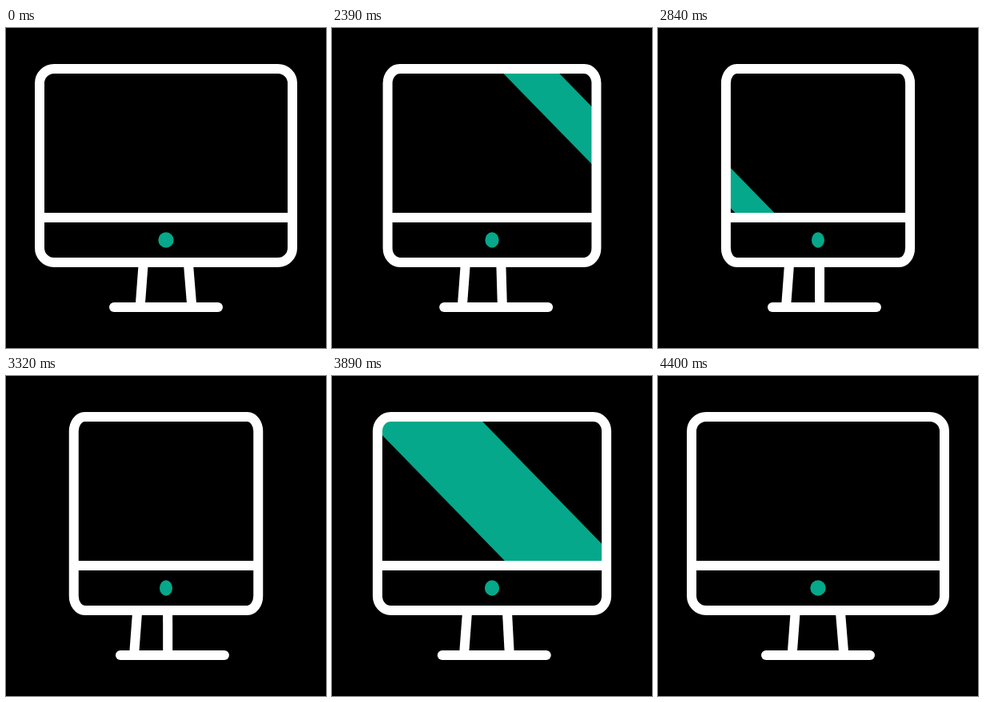
An HTML page with a canvas that plays this animation: 400x400 px, repeating every 4.43 s.

```html
<!DOCTYPE html>
<html lang="en">
<head>
<meta charset="utf-8">
<title>Turning monitor</title>
<style>
html, body { margin: 0; height: 100%; overflow: hidden; background: #000; }
canvas { display: block; }
</style>
</head>
<body>
<canvas id="stage" width="400" height="400"></canvas>
<script>
const LOOP = 4430, HOLD = 2030, STEP = 30;
const GREEN = '#05a88a', SLOPE = 1.025, DIVIDER = 237;
const ctx = document.getElementById('stage').getContext('2d');

const phase = (t, from, to) => Math.min(1, Math.max(0, (t - from) / (to - from)));
const mix = (a, b, k) => a + (b - a) * k;
const smooth = k => k * k * (3 - 2 * k);

// Easing curve with control points (x1, 0) and (x2, 1)
function ease(x, x1, x2) {
  let low = 0, high = 1;
  for (let i = 0; i < 24; i++) {
    const s = (low + high) / 2, r = 1 - s;
    if (3 * x1 * s * r * r + 3 * x2 * s * s * r + s ** 3 < x) low = s;
    else high = s;
  }
  return smooth(low);
}

function line(x1, y1, x2, y2) {
  ctx.beginPath();
  ctx.moveTo(x1, y1);
  ctx.lineTo(x2, y2);
  ctx.stroke();
}

// Diagonal band; left and right are its edges at the bottom of the screen
function stripe(left, right) {
  const edge = (x, y) => ctx.lineTo(x + (y - 231) / SLOPE, y);
  ctx.beginPath();
  edge(left, 40);
  edge(right, 40);
  edge(right, 240);
  edge(left, 240);
  ctx.fill();
}

function reflections(t) {
  if (t > 2120 && t < 3020) {
    const x = mix(709, 80, smooth(phase(t, 2120, 3020)));
    stripe(x - 189, x - 119);
    stripe(x - 49, x);
  }
  if (t > 3372 && t < 4400) {
    const x = mix(80, 662, smooth(phase(t, 3372, 4440)));
    stripe(x - 142, x);
  }
}

function draw(t) {
  const turn = ease(phase(t, HOLD, 2900), 0.4, 0.2) - ease(phase(t, 3230, 4400), 0.6, 0.4);
  const half = mix(158, 115, turn);
  const left = 200 - half, right = 200 + half;
  const body = new Path2D();
  body.roundRect(left, 51, half * 2, 242, { x: mix(18, 13.5, turn), y: 18 });

  ctx.fillStyle = '#000';
  ctx.fillRect(0, 0, 400, 400);

  ctx.fillStyle = GREEN;
  ctx.save();
  ctx.clip(body);
  ctx.beginPath();
  ctx.rect(0, 0, 400, DIVIDER);
  ctx.clip();
  reflections(t);
  ctx.restore();

  ctx.beginPath();
  ctx.ellipse(200, 265, mix(9.7, 8, turn), 9.7, 0, 0, 2 * Math.PI);
  ctx.fill();

  ctx.strokeStyle = '#fff';
  ctx.lineWidth = 12;
  ctx.lineCap = 'butt';
  ctx.stroke(body);
  line(left, DIVIDER, right, DIVIDER);
  line(mix(171.8, 164.2, turn), 293, mix(167.6, 160, turn), 349);
  line(mix(227.8, 202, turn), 293, mix(232.4, 202, turn), 349);
  ctx.lineCap = 'round';
  line(135 + 8 * turn, 349, 265 + 8 * turn, 349);
}

function frame(now) {
  const t = now % LOOP;
  draw(t < HOLD ? 0 : HOLD + Math.floor((t - HOLD) / STEP) * STEP);
  requestAnimationFrame(frame);
}
frame(0);
</script>
</body>
</html>
```
